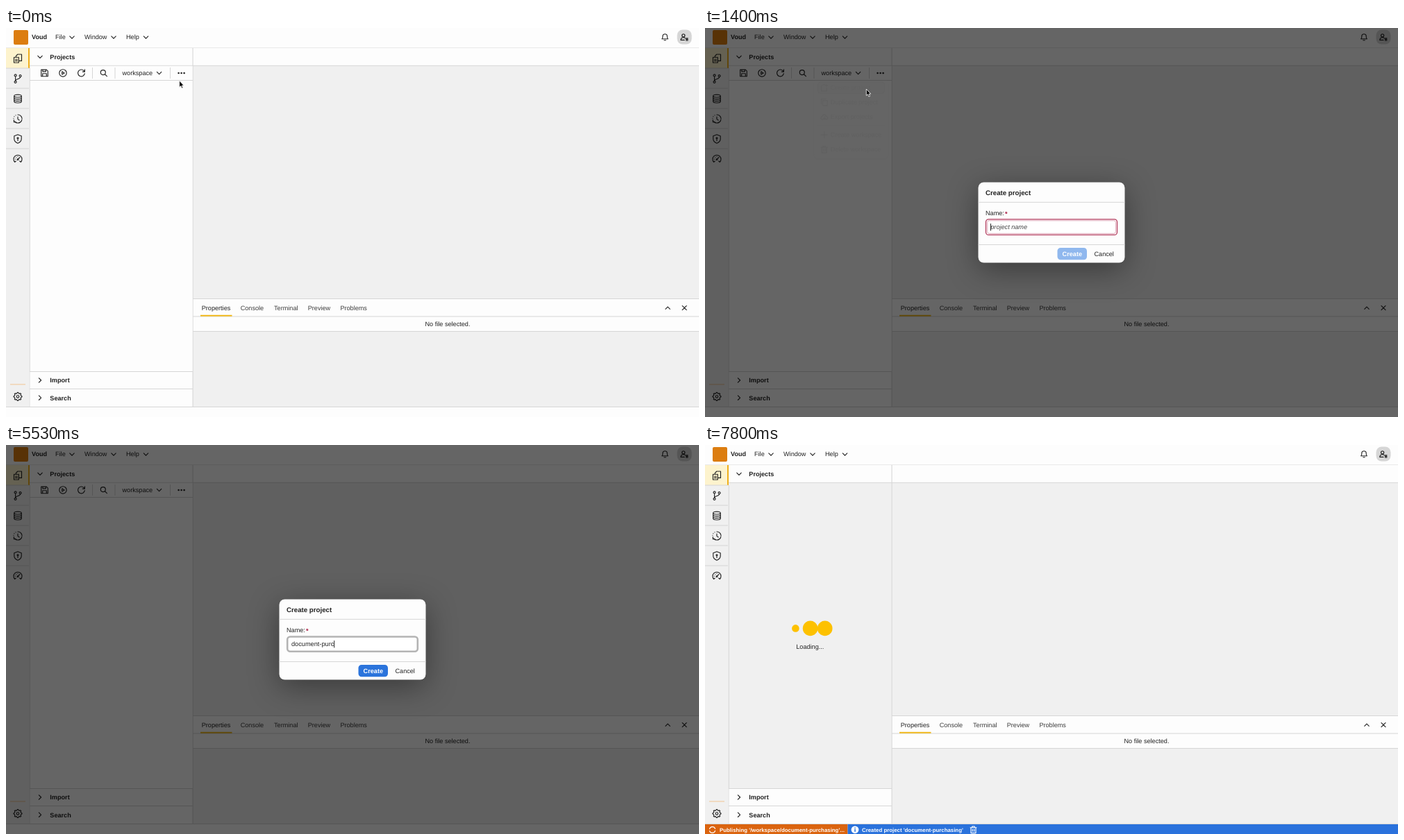
Recreate the animation shown at these times as an HTML page. Size 998 by 561 pixels, loop 7.87 s.

```html
<!DOCTYPE html>
<html lang="en">
<head>
<meta charset="utf-8">
<title>Create project</title>
<style>
  html, body { margin: 0; height: 100%; overflow: hidden; background: #f0f0f0; }
  svg { display: block; width: 100vw; height: 100vh; }
  text { font: 9.15px "Liberation Sans", Arial, sans-serif; fill: #222; white-space: pre; text-rendering: geometricPrecision; }
  .bold { font-weight: 700; }
  .mid { text-anchor: middle; }
  .soft { fill: #3c3c3c; }
  .title { font-weight: 700; font-size: 9.7px; }
  .hint { font-style: italic; fill: #444; }
  .white { fill: #fff; }
  .status { font-weight: 700; font-size: 7.85px; fill: #fff; }
  .icon { fill: none; stroke: #222; stroke-width: 1.15; stroke-linecap: round; stroke-linejoin: round; }
  .light { stroke: #fff; }
  #menu > .card { filter: drop-shadow(0 2px 4px rgba(0,0,0,.22)); }
  #dialog > .card { filter: drop-shadow(0 10px 22px rgba(0,0,0,.4)); }
</style>
</head>
<body>
<svg id="stage" viewBox="0 0 998 561"></svg>
<script>
const LOOP = 7870;
const PROJECT = 'document-purchasing';
const KEY_TIMES = [1870, 2400, 2870, 3070, 3330, 3600, 3800, 4070, 4470, 4800,
  5000, 5400, 5530, 6000, 6400, 6670, 6800, 7000, 7400];
const LINE = '#d6d6d6', PANEL = '#fdfdfd', GREY = '#f0f0f0';

const circle = (x, y, r) => `M${x - r} ${y}a${r} ${r} 0 1 0 ${2 * r} 0a${r} ${r} 0 1 0 ${-2 * r} 0`;
const rect = (x, y, w, h, fill, rx = 0, extra = '') =>
  `<rect x="${x}" y="${y}" width="${w}" height="${h}" rx="${rx}" fill="${fill}" ${extra}/>`;
const hline = (x1, x2, y, color = LINE) => rect(x1, y, x2 - x1, 1, color);
const vline = (x, y1, y2, color = LINE) => rect(x, y1, 1, y2 - y1, color);
const text = (x, cy, s, cls = '') => `<text x="${x}" y="${cy + 3.2}" class="${cls}">${s}</text>`;
const icon = (name, x, y, cls = '') =>
  `<path class="icon ${cls}" transform="translate(${x} ${y})" d="${ICONS[name]}"/>`;
const group = (id, body) => `<g id="${id}">${body}</g>`;

// Eight gear teeth as alternating radii around a circle
const gear = () => 'M' + Array.from({ length: 32 }, (_, i) => {
  const a = (i - .5) * Math.PI / 16, r = i % 4 < 2 ? 6 : 4.7;
  return `${(r * Math.cos(a)).toFixed(2)} ${(r * Math.sin(a)).toFixed(2)}`;
}).join('L') + 'Z' + circle(0, 0, 1.8);

const ICONS = {
  down: 'M-3.2-1.6L0 1.6L3.2-1.6',
  up: 'M-3.2 1.6L0-1.6L3.2 1.6',
  right: 'M-1.6-3.2L1.6 0L-1.6 3.2',
  close: 'M-3-3L3 3M3-3L-3 3',
  files: 'M-5.5-1.8h6.8v7.8h-6.8zM-2.6-2v-1.6l2.4-2.4h5.7v9.4h-4M-3.5 1.2h2.8M-3.5 3.4h2.8',
  branch: circle(-3.4, -4.6, 1.5) + circle(-3.4, 4.8, 1.5) + circle(3.6, -3.9, 1.5) +
    'M-3.4-3v6.2M3.6-2.3c0 3-6 2.5-7 5',
  database: 'M-5.3-4c0-2.6 10.6-2.6 10.6 0s-10.6 2.6-10.6 0v8c0 2.6 10.6 2.6 10.6 0v-8M-5.3-1.3c0 2.6 10.6 2.6 10.6 0M-5.3 1.4c0 2.6 10.6 2.6 10.6 0',
  history: 'M0-6A6 6 0 1 1-4.4 4M-5.6 1.6v3h3M0-3v3.4l2.2 1.6M-6-.8v.1M-5.1-3.4v.1M-3-5.3v.1',
  shield: 'M0-6.2L5.2-4.3V0C5.2 3 2.5 5.2 0 6.2C-2.5 5.2-5.2 3-5.2 0V-4.3ZM0 0v2.6' + circle(0, -1.2, 1),
  gauge: 'M-4.3 4.4A6 6 0 1 1 4.3 4.4L2.7 3M-4.3 4.4L-2.7 3M.6 0L3-2.6M-3.6 0v.1M-2.3-2.5v.1M0-3.6v.1' + circle(0, .6, .9),
  gear: gear(),
  save: 'M-4.8-4.8h7.6l2 2v7.6h-9.6zM-2.6-4.6v2.6h4.4v-2.6M-2.8 4.6v-3.8h5.6v3.8',
  play: circle(0, 0, 5.2) + 'M-1.3-2.1L2.1 0L-1.3 2.1Z',
  refresh: 'M4.8.8A4.9 4.9 0 1 1 3.6-3.3L4.8-2M4.9-5v3.2h-3.2',
  search: circle(-.9, -.9, 3.5) + 'M1.7 1.7L4.7 4.7',
  more: [-4, 0, 4].map(x => circle(x, 0, .7)).join(''),
  bell: 'M-4.3 2.4C-2.9 1-3.2-.2-3.2-1.5C-3.2-5.6 3.2-5.6 3.2-1.5C3.2-.2 2.9 1 4.3 2.4ZM-1.2 4.4h2.4',
  user: circle(-1.4, -2.4, 2.1) + 'M-5.2 4.2c0-4.4 5.4-4.6 6.6-2.4M-5.2 4.2h5.2M2.4 1.6h2.6M2.4 3.1h2.6M2.4 4.6h2.6',
  newProject: 'M.6-4.4h-2.2L-4.4-1.8V4.8H3.6V.4M3.2-4.8v3.4M1.5-3.1h3.4',
  copy: 'M-2.2-2.4h6.6v7.2h-6.6zM-4.4 2.4v-7.2h6.4',
  cloud: 'M-1.5 3.6h-1.5C-6 3.4-5.4-.4-2.8-.4C-2-4.6 3-3.8 2.8-.4C5.8-.6 5.8 3.4 3.2 3.6H2.4M.4-.6v4M-1.2 2l1.6 1.6L2 2',
  plus: 'M-4.4 0h8.8M0-4.4v8.8',
  trash: 'M-4.4-3h8.8M-1.7-3v-1.8h3.4v1.8M-3.5-3v7.8h7v-7.8M-1.2-.6v3M1.2-.6v3',
};

const frameView = [
  rect(0, 0, 998, 561, GREY),
  rect(0, 0, 998, 29, PANEL), hline(0, 998, 28.5),
  rect(11, 3, 21, 21, '#dc7d10', 2),
  text(37, 13.2, 'Voud', 'bold'),
  ...[['File', 71, 95], ['Window', 113, 155], ['Help', 173, 201.5]].map(
    ([label, x, arrow]) => text(x, 13.2, label) + icon('down', arrow, 13.5)),
  icon('bell', 949, 13.3),
  rect(966.5, 2.5, 21, 21, '#d6d6d6', 8), icon('user', 977, 13.2),

  rect(0, 29, 33, 29, '#fdf3cd'), rect(32, 29, 2, 29, '#f0b01c'),
  ...['files', 'branch', 'database', 'history', 'shield', 'gauge'].map(
    (name, i) => icon(name, 17, 44 + 29 * i) + (i < 5 ? hline(0, 33, 58 + 29 * i - .5) : '')),
  hline(6, 28, 513.5, '#f3c592'), icon('gear', 17, 531.5),
  vline(33.8, 58, 546),

  rect(34.5, 29, 234, 25, PANEL), hline(34, 269, 53.8),
  icon('down', 49, 41.8), text(63.3, 41.7, 'Projects', 'bold'),
  rect(34.5, 495, 234, 51, PANEL), hline(34, 269, 495), hline(34, 269, 520),
  icon('right', 49, 508), text(63.3, 508, 'Import', 'bold'),
  icon('right', 49, 533.3), text(63.3, 533.3, 'Search', 'bold'),

  rect(269, 29, 729, 25, PANEL), hline(269, 998, 53.8),
  rect(269, 391, 729, 46, PANEL),
  hline(269, 998, 390), hline(269, 998, 415.5), hline(269, 998, 437),
  vline(268.6, 29, 546),
  ...[['Properties', 281.7], ['Console', 337.7], ['Terminal', 386], ['Preview', 434.7], ['Problems', 481.4]].map(
    ([label, x], i) => text(x, 403.4, label, i ? 'soft' : '')),
  rect(280, 413.8, 45.5, 2, '#f0b81c'),
  icon('up', 953, 403.7), icon('close', 977, 403.6),
  text(636, 426.6, 'No file selected.', 'mid'),
  rect(0, 546, 998, 15, PANEL), hline(0, 998, 546),
].join('');

const toolbar = [
  rect(34.8, 54.8, 233.8, 440.2, PANEL), hline(34, 269, 75),
  rect(243.5, 57, 18.5, 16, '#e6e6e6', 4, 'id="moreHover"'),
  icon('save', 55.5, 64.9), icon('play', 82, 64.9), icon('refresh', 108.5, 64.9),
  icon('search', 140.7, 65), icon('more', 252.6, 65),
  text(167.5, 64.6, 'workspace'), icon('down', 220.6, 65),
  ...[124, 156.5, 236].map(x => vline(x, 57, 73)),
].join('');

const menu = [
  rect(157, 73.5, 106.5, 114, '#fff', 6, 'class="card"'),
  rect(162.5, 78, 96, 16.5, '#e9e9e9', 4, 'stroke="#7c7c7c"'),
  hline(162, 259, 140.7),
  ...[['newProject', 86, 'Create project'], ['copy', 107, 'Duplicate project'], ['cloud', 128.2, 'Export projects'],
    ['plus', 154, 'Create workspace'], ['trash', 175, 'Delete workspace']].map(
    ([name, y, label]) => icon(name, 171.8, y) + text(180.8, y - .1, label, 'soft')),
].join('');

const dialog = [
  rect(393.5, 222.5, 211, 116, PANEL, 8, 'class="card"'),
  hline(393.5, 604.5, 250.8), hline(393.5, 604.5, 312),
  text(404, 237.3, 'Create project', 'title'),
  text(404, 267.2, 'Name:'), text(432, 268, '*', 'bold" style="fill:#a8143c'),
  group('emptyField', rect(404.5, 275.8, 189, 22.6, '#fff', 4, 'stroke="#b23a5c" stroke-width="1.3"') +
    rect(406.6, 277.8, 184.8, 18.6, '#fff', 2.5, 'stroke="#d893a7" stroke-width=".8"') +
    text(411.3, 286.9, 'project name', 'hint')),
  group('filledField', rect(405.2, 276.5, 187.6, 21.2, '#fff', 4, 'stroke="#b4b4b4" stroke-width="2.6"')),
  '<text id="typed" x="411" y="290.2" style="font-size:9.2px"></text>',
  rect(411, 282, .9, 10.4, '#111', 0, 'id="caret"'),
  rect(507.5, 317, 42.5, 17.3, '#2b74dc', 4.5, 'id="createButton"'),
  text(528.8, 325.6, 'Create', 'bold white mid'),
  text(574.7, 325.6, 'Cancel', 'mid'),
].join('');

const loading = [
  ...[[130.4, 5.3], [151.6, 10.8], [172.7, 10.8]].map(
    ([x, r]) => `<circle cx="${x}" cy="264.4" r="${r}" fill="#fdc100"/>`),
  text(151.3, 290.5, 'Loading...', 'mid'),
  rect(0, 547, 205.5, 14, '#db640f'), rect(205.5, 547, 792.5, 14, '#2a72dc'),
  '<path class="icon light" d="M6.6 553.6a4.2 4.2 0 0 1 8-.2M14.6 556.4a4.2 4.2 0 0 1-8 .2"/>',
  text(21, 554.5, `Publishing '/workspace/${PROJECT}'...`, 'status'),
  '<circle cx="216" cy="554.8" r="5.4" fill="#fff"/>',
  rect(215.3, 553.8, 1.5, 4, '#2a72dc'), rect(215.3, 551.6, 1.5, 1.4, '#2a72dc'),
  text(226, 554.5, `Created project '${PROJECT}'`, 'status'),
  icon('trash', 386.5, 554.8, 'light'),
].join('');

const pointer = '<path d="M0 0V9.4L2.1 7.5L3.6 11L5.2 10.3L3.7 7H6.5Z" fill="#000" stroke="#fff" stroke-width=".8"/>';

document.getElementById('stage').innerHTML = frameView + group('toolbar', toolbar) + group('menu', menu) +
  rect(0, 0, 998, 561, '#000', 0, 'id="shade" fill-opacity=".6"') +
  group('dialog', dialog) + group('loading', loading) + group('pointer', pointer);

const el = id => document.getElementById(id);
const show = (id, on) => { el(id).style.display = on ? '' : 'none'; };
const clamp = v => Math.min(1, Math.max(0, v));
const mix = (a, b, k) => a + (b - a) * k;

function pointerAt(t) {
  const step = 200 / 3, held = Math.floor((t + 4) / step) * step;
  const reach = clamp(held / 133), k = clamp((held - 530) / 670), ease = k * k * (3 - 2 * k);
  return [mix(mix(249.7, 251.5, reach), 232.3, ease), mix(mix(76, 64, reach), 88, ease)];
}

function draw(t) {
  const inDialog = t >= 1400 && t < 7800;
  const typed = PROJECT.slice(0, KEY_TIMES.filter(k => k <= t).length);

  show('toolbar', t < 7800);
  show('moreHover', t >= 270 && t < 470);
  show('menu', t >= 470 && t < 1470);
  el('menu').style.opacity = t < 1400 ? 1 : .05;
  show('shade', inDialog);
  show('dialog', inDialog);
  show('loading', t >= 7800);

  show('emptyField', !typed);
  show('filledField', typed);
  el('createButton').setAttribute('fill', typed ? '#2b74dc' : '#90b8ee');
  el('typed').textContent = typed;
  const width = inDialog && typed ? el('typed').getComputedTextLength() : 0;
  el('caret').setAttribute('x', 411 + width);

  show('pointer', t < 1870);
  el('pointer').setAttribute('transform', `translate(${pointerAt(t)})`);
}

function tick() {
  draw(performance.now() % LOOP);
  requestAnimationFrame(tick);
}
tick();
</script>
</body>
</html>
```
